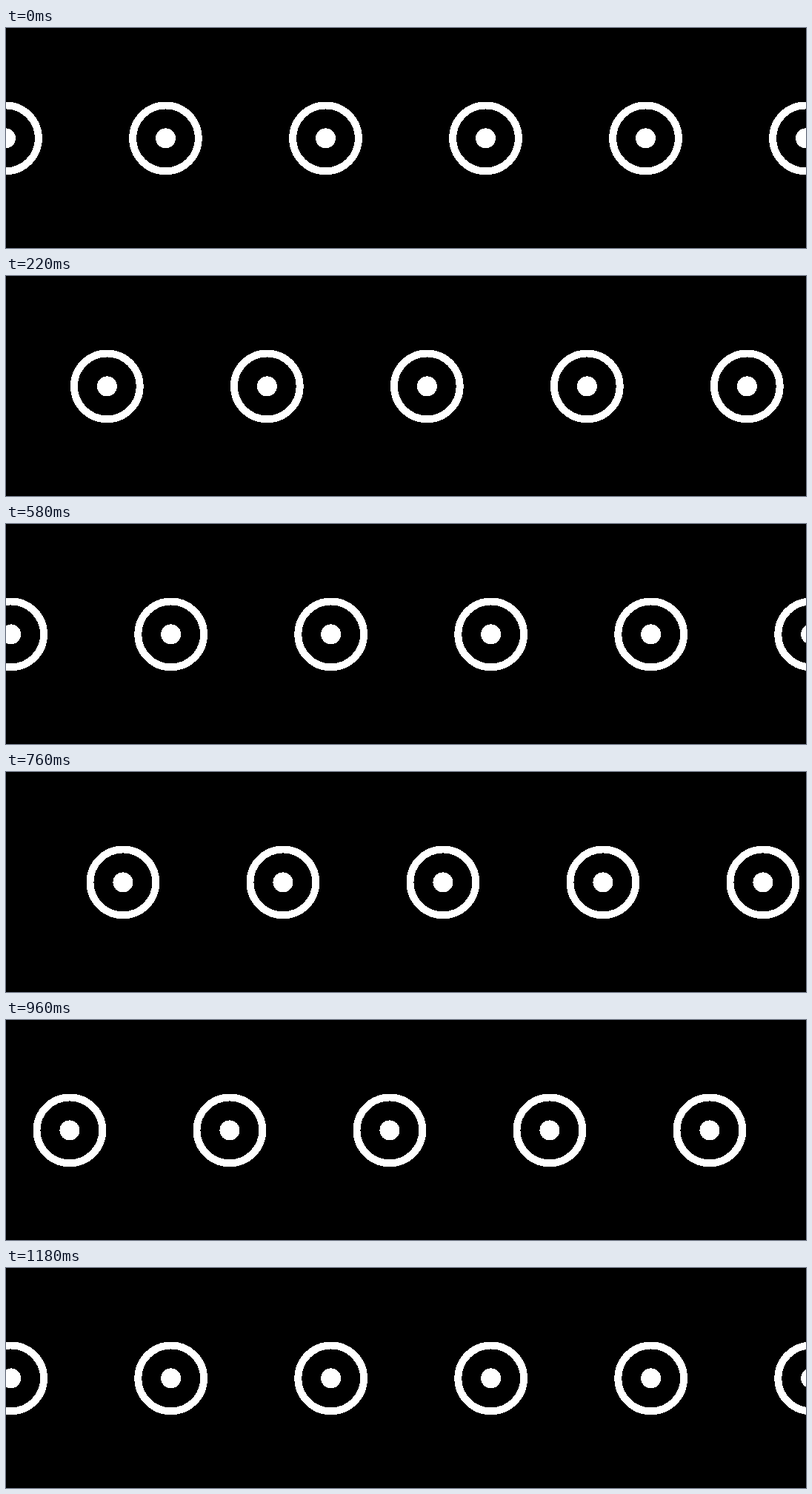
Recreate the animation shown at these times as an HTML page. Size 1080 by 297 pixels, loop 1.2 s.

```html
<!DOCTYPE html>
<html lang="en">
<head>
<meta charset="utf-8">
<title>Rolling rings</title>
<style>
  html, body { margin: 0; width: 100%; height: 100%; overflow: hidden; background: #000; }
  svg { display: block; }
</style>
</head>
<body>
<svg width="1080" height="297" viewBox="0 0 1080 297" shape-rendering="crispEdges">
  <defs>
    <g id="ring">
      <circle r="44.4" fill="none" stroke="#fff" stroke-width="9.9"/>
      <circle r="13.5" fill="#fff"/>
    </g>
  </defs>
  <g id="row"></g>
</svg>
<script>
  const SPACING = 216, PERIOD = 600, STEP = 20;
  const row = document.getElementById('row');

  row.innerHTML = Array.from({ length: 7 }, (_, i) =>
    `<use href="#ring" x="${i * SPACING - 0.5}" y="148.9"/>`).join('');

  // The row slides left by one spacing per period, in 20 ms steps.
  function draw(now) {
    const t = Math.floor((now % PERIOD) / STEP) * STEP;
    row.setAttribute('transform', `translate(${-SPACING * t / PERIOD} 0)`);
  }

  function loop() {
    draw(performance.now());
    requestAnimationFrame(loop);
  }
  loop();
</script>
</body>
</html>
```
